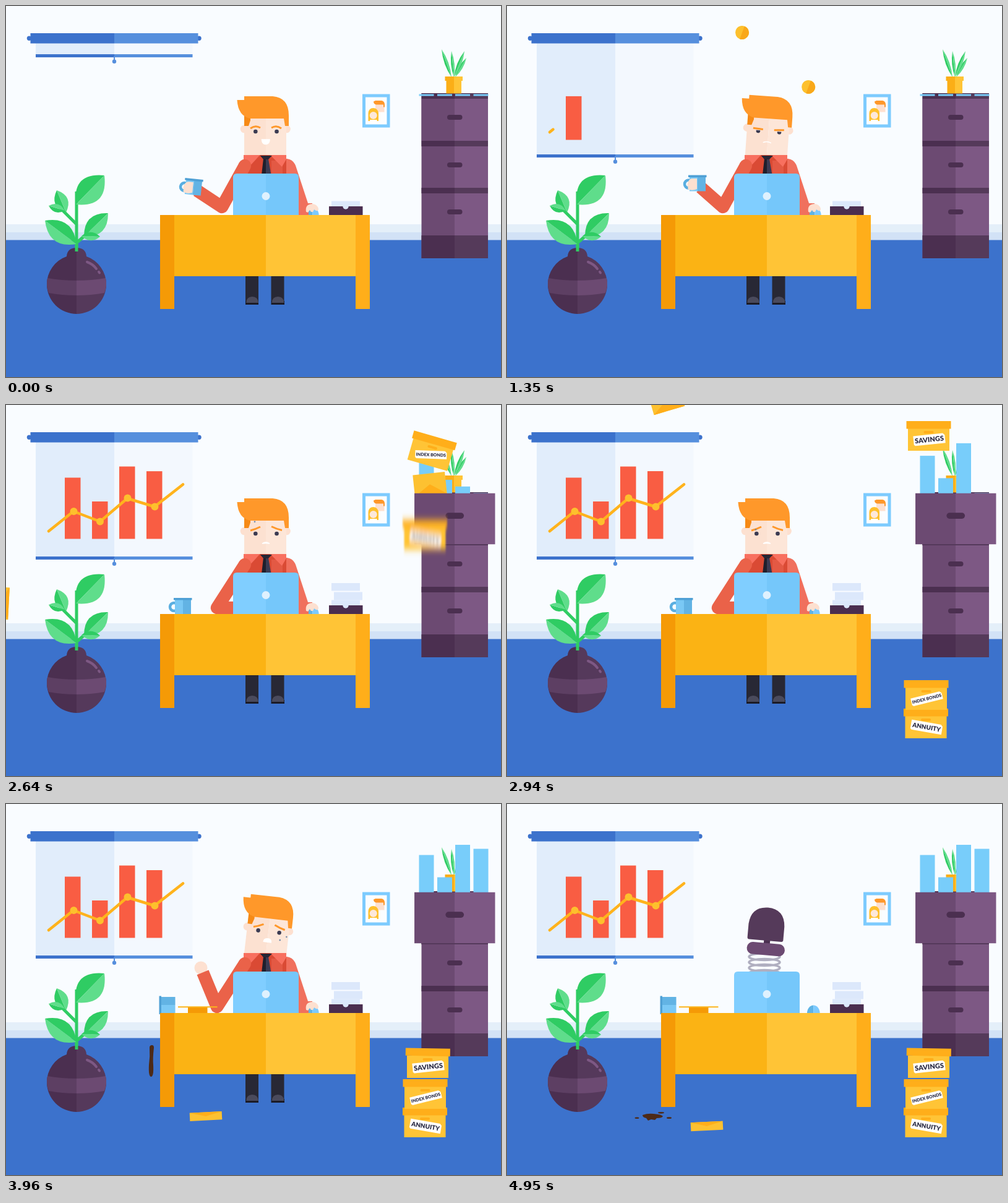
Recreate the animation shown at these times as an HTML page. Size 800 by 600 pixels, loop 5070 ms.

```html
<!DOCTYPE html>
<html lang="en">
<head>
<meta charset="utf-8">
<title>Busy office</title>
<style>
html, body { margin: 0; width: 100%; height: 100%; overflow: hidden; background: #f9fcff; }
svg { display: block; width: 100vw; height: 100vh; }
text { font-family: Lato, "Open Sans", sans-serif; font-weight: 900; text-anchor: middle; }
</style>
</head>
<body>
<svg viewBox="0 0 800 600">
  <defs>
    <filter id="blur" x="-20%" y="-40%" width="140%" height="180%"><feGaussianBlur stdDeviation="1 6"/></filter>
    <g id="envelope">
      <path fill="#fdc131" d="M-26-17.5h52v35h-52z"/>
      <path fill="#ffae1a" d="M-26-17.5h52L0 0z"/>
    </g>
    <g id="coinShape">
      <circle r="11" fill="#fdc02d"/>
      <path fill="#f9a81a" d="M0-11a11 11 0 0 1 0 22z"/>
    </g>
  </defs>

  <!-- room -->
  <path fill="#f9fcff" d="M0 0h800v353H0z"/>
  <path fill="#e4eff9" d="M0 353h800v14H0z"/>
  <path fill="#d2e2f6" d="M0 366h800v13H0z"/>
  <path fill="#3c72cc" d="M0 378.500h800V600H0z"/>

  <!-- projector screen -->
  <rect id="sheetL" x="48" y="58" width="127" fill="#e1edfb"/>
  <rect id="sheetR" x="175" y="58" width="126.500" fill="#f3f8fe"/>
  <g id="screenBar">
    <path fill="#3c72cc" d="M48 0h127v5H48z"/>
    <path fill="#568fdd" d="M175 0h126.500v5H175zM174 3h2v6h-2z"/>
    <circle cx="175" cy="11.700" r="3.200" fill="#568fdd"/>
  </g>
  <circle cx="37.500" cy="52.300" r="3.700" fill="#3c72cc"/>
  <circle cx="312" cy="52.300" r="3.700" fill="#3c72cc"/>
  <path fill="#3c72cc" d="M39.500 44H175v16.500H39.500z"/>
  <path fill="#568fdd" d="M175 44h135.500v16.500H175z"/>
  <g id="bars" fill="#f95d43"></g>
  <path id="trend" fill="none" stroke="#ffb31c" stroke-width="4.500" stroke-linecap="round" stroke-linejoin="round" d="M69 204L109 172L152 188.500L196 151L240 164.500L286 128.500"/>
  <g id="dots" fill="#fdc02d"></g>

  <!-- picture -->
  <path fill="#7dcbfe" d="M576 142.500h44.500v54H576z"/>
  <path fill="#fbfdff" d="M581 147.500h34.500v44H581z"/>
  <path fill="#fde0d0" d="M597 158h14.500v13.500H597z"/>
  <path fill="#ff982a" d="M594 154.500l3-1.500h10q5 1 5 6.500v4h-2v-4h-12q-4-1-4-5z"/>
  <path fill="#ffc02c" d="M585.500 186v-13q1-8 8-8t8.500 8v13z"/>
  <circle cx="593.700" cy="177" r="6" fill="#fde8da"/>
  <path fill="#fff" d="M588 184h11.500v7H588z"/>

  <!-- floor plant -->
  <g id="plant">
    <path fill="none" stroke="#2fcc63" stroke-width="5" d="M114 398V300M114 353L92 331M114 383L136 364"/>
  </g>
  <path fill="#4b2f50" d="M66 450a48 48 0 0 1 32-45q1-14 16-14v107a48 48 0 0 1-48-48z"/>
  <path fill="#55395b" d="M162 450a48 48 0 0 0-32-45q-1-14-16-14v107a48 48 0 0 0 48-48z"/>
  <path fill="#5d3f63" d="M67 440q22 4 47 4v24q-24 0-45-4q-5-12-2-24z"/>
  <path fill="#6c4a72" d="M161 440q-22 4-47 4v24q24 0 45-4q5-12 2-24z"/>
  <path fill="none" stroke="#7d5884" stroke-width="4" stroke-linecap="round" d="M131 414q9 3 15 11M150 430l1 1.500"/>
  <path fill="#2fcc63" d="M111.500 385h5v12h-5z"/>

  <!-- cabinet -->
  <path fill="#6c4a72" d="M671.500 141H725v267h-53.500z"/>
  <path fill="#7d5884" d="M725 141h54v267h-54z"/>
  <path fill="#4b2f50" d="M671.500 141H725v9h-53.500zM671.500 218H725v9h-53.500zM671.500 294H725v9h-53.500zM671.500 371H725v37h-53.500z"/>
  <path fill="#553a5a" d="M725 141h54v9h-54zM725 218h54v9h-54zM725 294h54v9h-54zM725 371h54v37h-54z"/>
  <g fill="#4b2f50">
    <rect x="713" y="253" width="24.500" height="8" rx="4"/>
    <rect x="713" y="329" width="24.500" height="8" rx="4"/>
  </g>
  <g id="potPlant"></g>
  <path fill="#fbae17" d="M711.500 121H724v20.500h-12.500zM709.500 114H724v7h-14.500z"/>
  <path fill="#ffc436" d="M724 121h12v20.500h-12zM724 114h14v7h-14z"/>
  <g id="books" fill="#78cdfa"></g>
  <use id="envC" href="#envelope"/>
  <g id="drawer">
    <path fill="#6c4a72" d="M671.500 150H725v68h-53.500z"/>
    <path fill="#7d5884" d="M725 150h54v68h-54z"/>
    <rect x="713" y="176" width="24.500" height="8" rx="4" fill="#4b2f50"/>
  </g>
  <path id="drawerEdge" fill="#55395b" d="M671.500 225h107.500v2H671.500z"/>

  <!-- storage boxes -->
  <g id="boxes"></g>

  <!-- chair -->
  <g id="chair">
    <g fill="none" stroke="#b0afc0" stroke-width="3.500">
      <ellipse cx="416" cy="247" rx="25" ry="5.500"/>
      <ellipse cx="416" cy="256" rx="25" ry="5.500"/>
      <ellipse cx="416" cy="265" rx="25" ry="5.500"/>
      <ellipse cx="416" cy="274" rx="25" ry="5.500"/>
    </g>
    <g transform="rotate(5 419 235)">
      <path fill="#4b2f50" d="M414 215h10v14h-10z"/>
      <rect x="387.500" y="225" width="61.500" height="19.500" rx="9.500" fill="#6c4a72"/>
      <path fill="#553a5a" d="M387 218v-22q2-28 29-28.500q27 .5 29 28.500v22q0 3-3 3h-52q-3 0-3-3z"/>
    </g>
  </g>

  <!-- mouse -->
  <g id="mouse">
    <path fill="#5fb4e6" d="M485 338a10.300 12.500 0 0 1 10.300-12.500V338z"/>
    <path fill="#7ccaff" d="M495.300 325.500a10.300 12.500 0 0 1 10.300 12.500h-10.300z"/>
  </g>

  <!-- man -->
  <g id="man">
    <path fill="#282835" d="M387 325h21v152h-21zM428.500 325h21v152h-21z"/>
    <path fill="#1b1b26" d="M387 477h21v6h-21zM428.500 477h21.500v6h-21.500z"/>
    <path fill="#4a4a5c" d="M388 480q1-10 10-10t10 10zM429.500 480q1-10 10-10t10 10z"/>
    <g id="head">
      <circle cx="385" cy="199" r="6.300" fill="#fde0d0"/>
      <circle cx="453.500" cy="199" r="6.300" fill="#fde0d0"/>
      <path fill="#fce1d1" d="M385 176h35v70h-35z"/>
      <path fill="#fde6d8" d="M420 176h33v70h-33z"/>
      <path fill="#f68a16" d="M385 174h10v11l-3 9h-7z"/>
      <path fill="#ff982a" d="M373.500 152H385v-6h46q26 2 26 31v17h-6l-2-12h-54q-20-4-21.500-30z"/>
      <g fill="#3b3b52"><circle cx="403.300" cy="203" r="3.300"/><circle cx="437.500" cy="203" r="3.300"/></g>
      <path id="lids" fill="#fde3d4" d="M398 198h10v4h-10zM432 198h10v4h-10z"/>
      <path id="brows" fill="none" stroke="#ff982a" stroke-width="3"/>
      <path id="mouth" stroke="#fff" stroke-width="1.500" stroke-linecap="round"/>
      <g id="sweat" fill="#6d87a8"></g>
    </g>
    <path fill="#f0705d" d="M445 247h9q10 1 14 11l21 64v16h-17l-20-60z"/>
    <path fill="#da4a34" d="M384 241h69v99h-69z"/>
    <path fill="#e35944" d="M429 250h18v30h-18z"/>
    <path fill="#f8705f" d="M384 241h26.500L393 260l-9-12zM453 241h-26l19 19l7-12z"/>
    <path fill="#1f1f2c" d="M411 242h9v31h-7l3-26z"/>
    <path fill="#3a3a52" d="M420 247l4 0 4.500 26H420z"/>
    <path fill="#262635" d="M411 242h19l-6 6h-8z"/>
    <g id="leftArm">
      <circle id="hand" r="10.500" fill="#fde0d0"/>
      <path id="sleeve" fill="none" stroke="#ea6249" stroke-width="20.500" stroke-linejoin="round"/>
      <circle cx="386" cy="258" r="10.200" fill="#ea6249"/>
    </g>
    <g id="mouseHand" fill="#fde0d0">
      <path fill="#f0705d" d="M482 319h13v4h-13z"/>
      <path d="M485 333q-2-12 9-13q9 0 11 8q0 4-4 3l-3-2l-2 4h-3l-2-3l-3 4z"/>
    </g>
  </g>

  <!-- mug -->
  <g id="mug">
    <circle cx="-14.500" cy="1" r="6.500" fill="none" stroke="#5aaee0" stroke-width="4.500"/>
    <path fill="#7ac8f5" d="M-13-12H0v24.500h-13z"/>
    <path fill="#62b3e4" d="M0-12h13v24.500H0z"/>
    <path fill="#4fa0d5" d="M-15-13.500h29.500v3.500H-15z"/>
    <path id="fingers" fill="#fde0d0" d="M-15-3q2-5 7-5h7v17q-6 3-13 1q-3-2-1-5q-3-2-1-4q-1-2 1-4z"/>
  </g>
  <g id="deskNote">
    <path fill="#f59a06" d="M294 329h31.500v9H294z"/>
    <path fill="#fdb51c" d="M278 327.300h63.500v2H278z"/>
  </g>

  <!-- desk and laptop -->
  <g id="papers" fill="#dce8fb">
    <path d="M526 315.500h46V326h-46z"/>
    <path id="paper1" d="M530 302.500h46v13h-46z"/>
    <path id="paper2" d="M526 289h46v12.500h-46z"/>
  </g>
  <path fill="#4a2e4f" d="M522 324h54.500v14H522z"/>
  <circle cx="549" cy="324" r="4.700" fill="#dce8fb"/>
  <path fill="#80ceff" d="M420 271v67h-53v-61q0-6 6-6z"/>
  <path fill="#75c7fa" d="M420 271v67h53v-61q0-6-6-6z"/>
  <circle cx="420" cy="307.500" r="6.500" fill="#dff1fe"/>
  <path fill="#fbb314" d="M271 338h149v99H271z"/>
  <path fill="#ffc436" d="M420 338h146v99H420z"/>
  <path fill="#f59a06" d="M249 338h23v152h-23z"/>
  <path fill="#ffae1a" d="M565 338h23v152h-23z"/>

  <!-- flying things -->
  <path id="drop" fill="#4d2a17" d="M232 394q0-4 4-4q3 0 3 4q-2 18-1 28q1 19-3.500 19q-4.500 0-3.500-19q2-14 1-28z"/>
  <g id="splat" fill="#4d2a17">
    <path d="M219 503q8-3 18-2q13 1 15 4q-1 3-10 3l-3 3l-6-1l-5 2l-3-4q-6-1-6-5z"/>
    <ellipse cx="249" cy="499.300" rx="5" ry="1.400"/>
    <ellipse cx="262" cy="507.700" rx="4" ry="1.400"/>
    <ellipse cx="210" cy="507.700" rx="3.500" ry="1.200"/>
  </g>
  <use id="envL" href="#envelope"/>
  <use id="envA" href="#envelope"/>
  <use id="envB" href="#envelope"/>
  <use id="coin0" href="#coinShape"/>
  <use id="coin1" href="#coinShape"/>
  <text id="dollar" font-size="35" y="12" fill="#3fd57a">$</text>
</svg>

<script>
const LOOP = 5070, STEP = 30;
const $ = id => document.getElementById(id);

function add(parent, tag, attrs) {
  const el = document.createElementNS('http://www.w3.org/2000/svg', tag);
  for (const name in attrs) el.setAttribute(name, attrs[name]);
  parent.appendChild(el);
  return el;
}
const set = (el, name, value) => el.setAttribute(name, value);
const place = (el, x, y, r = 0, sx = 1, sy = sx) =>
  set(el, 'transform', `translate(${x} ${y}) rotate(${r}) scale(${sx} ${sy})`);
const turn = (el, dx, dy, r, cx, cy) =>
  set(el, 'transform', `translate(${dx} ${dy}) rotate(${r} ${cx} ${cy})`);
const show = (el, on) => { el.style.display = on ? '' : 'none'; };

// Eased value from pairs: time, value, time, value ...
function key(t, ...k) {
  if (t <= k[0]) return k[1];
  for (let i = 2; i < k.length; i += 2) {
    if (t < k[i]) {
      const u = (t - k[i - 2]) / (k[i] - k[i - 2]);
      return k[i - 1] + (k[i + 1] - k[i - 1]) * u * u * (3 - 2 * u);
    }
  }
  return k[k.length - 1];
}
const line = (t, t0, a, t1, b) => a + (b - a) * Math.min(1, Math.max(0, (t - t0) / (t1 - t0)));
const fall = (t, t0, a, t1, b) => a + (b - a) * line(t, t0, 0, t1, 1) ** 2;
const spring = s => s <= 0 ? 0 : 1 - Math.exp(-0.0092 * s) * Math.cos(0.0105 * s);

// Two-tone leaf from base to tip
function leaf(parent, x1, y1, x2, y2, fat, c1 = '#2fcc63', c2 = '#5fdd8b') {
  [[1, c1], [-1, c2]].forEach(([side, fill]) => {
    const cx = (x1 + x2) / 2 + (y2 - y1) * fat * side;
    const cy = (y1 + y2) / 2 - (x2 - x1) * fat * side;
    add(parent, 'path', { fill, d: `M${x1} ${y1}Q${cx} ${cy} ${x2} ${y2}z` });
  });
}
leaf($('plant'), 113, 321, 159, 274, 0.62);
leaf($('plant'), 97, 334, 82, 298, 0.55);
leaf($('plant'), 95, 331, 69, 323, 0.5);
leaf($('plant'), 114, 385, 63, 347, 0.52, '#5fdd8b', '#2fcc63');
leaf($('plant'), 126, 373, 165, 335, 0.52);
leaf($('plant'), 122, 372, 152, 373, 0.45);
leaf($('potPlant'), 720, 115, 704, 70, 0.13);
leaf($('potPlant'), 724, 115, 720, 73, 0.13);
leaf($('potPlant'), 726, 115, 744, 84, 0.16);
leaf($('potPlant'), 724, 115, 741, 73, 0.14);

const bars = [[95, 99], [139, 60.5], [183, 117], [227, 109.5]].map(([x, h]) =>
  ({ h, el: add($('bars'), 'rect', { x, width: 25.5 }) }));
const dots = [[109.5, 172, 51], [152, 188.5, 97], [196.5, 150.500, 155], [240.5, 164.5, 201]].map(([cx, cy, at]) =>
  ({ at, el: add($('dots'), 'circle', { cx, cy }) }));
const books = [[667.5, 60, 2520], [697, 24, 2520], [726, 76.5, 2625], [755.5, 70, 3180]].map(([x, h, start]) =>
  ({ h, start, el: add($('books'), 'rect', { x, width: 24 }) }));
const drops = [[402, 2600], [392, 3020], [440, 3190], [450, 3340]].map(([cx, start]) =>
  ({ start, el: add($('sweat'), 'circle', { cx, r: 1.3 }) }));

// Box drawn around its own centre
function makeBox(label, size, tilt, lh) {
  const g = add($('boxes'), 'g', {});
  add(g, 'path', { fill: '#ffc436', d: 'M-33.500-12h67v36h-67z' });
  add(g, 'rect', { x: -8, y: -8, width: 16, height: 4, rx: 2, fill: '#ffae1a' });
  const tag = add(g, 'g', { transform: `translate(1 6) rotate(${tilt})` });
  add(tag, 'path', { fill: '#fff', d: `M-25.500 ${-lh / 2}h48l3 3v${lh - 3}h-49l-2-2z` });
  add(tag, 'text', { 'font-size': size, y: size * 0.36, fill: '#2d2d44' }).textContent = label;
  const lid = add(g, 'path', { fill: '#ffae1a', d: 'M-36-24h72v12.500h-72z' });
  return { g, lid };
}
const annuity = makeBox('ANNUITY', 10, 10, 16);
const bonds = makeBox('INDEX BONDS', 7, -14, 13);
const savings = makeBox('SAVINGS', 11, -6, 16);

const trendLength = $('trend').getTotalLength();

// Drops in, hits the head, then flies off under gravity
function coin(el, t, hit, x, y, vx, up) {
  const s = t - hit, g = 0.0009;
  show(el, s > -230 && s < 1000);
  if (s < 0) return place(el, x, fall(t, hit - 230, -14, hit, y), 20);
  const land = (up + Math.sqrt(up * up + 4 * g * (456 - y))) / (2 * g);
  const b = s - land;
  const cy = b < 0 ? y - up * s + g * s * s : 456 - 0.25 * b + g * b * b;
  place(el, x + vx * s, cy, 20 + vx * (s - 115) * 0.5);
}

function drawScreen(t) {
  const y = key(t, 640, 78, 1180, 251, 1350, 240, 1500, 245);
  set($('sheetL'), 'height', y - 57);
  set($('sheetR'), 'height', y - 57);
  place($('screenBar'), 0, y);
  bars.forEach(({ h, el }, i) => {
    const now = h * spring(t - 1265 - 230 * i);
    set(el, 'y', 216.5 - now);
    set(el, 'height', now);
  });
  const drawn = line(t, 1317, 0, 2522, trendLength);
  show($('trend'), drawn > 0);
  set($('trend'), 'stroke-dasharray', `${drawn} 999`);
  dots.forEach(({ at, el }) => set(el, 'r', line(drawn, at - 10, 0, at + 12, 6)));
}

function drawCabinet(t) {
  const open = spring(t - 1945);
  const sx = 1 + 0.213 * open, sy = 1 + 0.213 * open;
  set($('drawer'), 'transform', `translate(725.300 184.400) scale(${sx} ${sy}) translate(-725.300 -184.400)`);
  show($('drawerEdge'), open > 0.5);
  books.forEach(({ h, start, el }) => {
    const now = h * spring(t - start);
    set(el, 'y', 142.5 - now);
    set(el, 'height', now + 3);
  });
  place($('envC'), 685, fall(t, 2480, -40, 2700, 188 + 90), 174);
  show($('envC'), t > 2480 && t < 2670);

  place(annuity.g, 677, fall(t, 2480, -50, 2716, 515));
  set(annuity.g, 'filter', t > 2560 && t < 2716 ? 'url(#blur)' : 'none');
  place(bonds.g, 677.5 + key(t, 2640, 10, 2786, 0), fall(t, 2500, -50, 2786, 469), key(t, 2640, 16, 2786, 0));
  place(savings.g, 681.5, fall(t, 2820, -50, 3080, 419));
  place(savings.lid, 0, key(t, 3080, 0, 3150, -12, 3270, -3, 3400, 0),
    key(t, 3080, 0, 3150, -8, 3270, -3, 3400, 1));
}

const FACES = {
  happy: ['M395 198q8-6 16-1M429 197q8-5 16 1', 'M413.500 216h12.500q0 7-6 7.500t-6.500-7.500z'],
  angry: ['M395 199l16 1M429 200l16-1', 'M413 221q6-3 12 0'],
  sad: ['M395 198q8-2 16-6M429 191.500q8 4 17 6', 'M414 219q6-4 12 0q-6-1-12 0z'],
  gasp: ['M395 198q8-2 16-6M429 191.500q8 4 17 6', 'M414 220q0-5 6-5.500t6 5.500z']
};

function drawMan(t) {
  const crouch = key(t, 4540, 0, 4690, 14);
  const lift = t > 4690 ? 14 - 520 * ((t - 4690) / 250) ** 2 : crouch;
  place($('man'), 0, lift);
  show($('man'), t < 4940);

  const idle = t < 1080 ? Math.sin(t / 540 * Math.PI) : 0;
  const tilt = key(t, 1220, 0, 1350, 4, 1440, 2, 1530, -4, 1700, 0, 3720, 0, 3960, 6.5, 4400, 0);
  turn($('head'), 0, key(t, 1640, 0, 2040, 4, 2640, 5, 3720, 5, 3960, 3) - 2 * Math.abs(idle), tilt - idle, 420, 240);

  const mood = t < 1230 ? 'happy' : t < 1680 ? 'angry' : t < 3100 ? 'sad' : 'gasp';
  set($('brows'), 'd', FACES[mood][0]);
  set($('mouth'), 'd', FACES[mood][1]);
  set($('mouth'), 'fill', mood === 'angry' ? 'none' : '#fff');
  show($('lids'), mood === 'angry');
  drops.forEach(({ start, el }) => {
    show(el, t > start && t < start + 800);
    set(el, 'cy', line(t, start, 182, start + 800, 216));
  });

  // Left arm and mug
  const mx = key(t, 540, 303, 1350, 308, 1650, 308, 1900, 286) - 4 * idle;
  const my = key(t, 540, 293, 1350, 287, 1650, 287, 1900, 325.5) - 3 * Math.abs(idle);
  const mr = key(t, 540, 6, 1350, 0);
  const held = t < 1950;
  const hx = held ? mx - 1 : key(t, 2100, 286, 2400, 380, 3690, 380, 3810, 288, 3960, 315, 4360, 315, 4560, 380);
  const hy = held ? my + line(t, 1700, 1, 1900, 2.5) : key(t, 2000, 328, 3780, 328, 3960, 265, 4360, 265, 4560, 328);
  const ex = key(t, 1650, 349, 1900, 352, 2100, 352, 2400, 341);
  const ey = key(t, 1650, 325, 1900, 328);
  const reach = Math.hypot(hx - ex, hy - ey) || 1;
  const cut = Math.max(0, reach - 8) / reach;
  set($('hand'), 'cx', hx);
  set($('hand'), 'cy', hy);
  set($('sleeve'), 'd', `M386 258L${ex} ${ey}L${ex + (hx - ex) * cut} ${ey + (hy - ey) * cut}`);

  const tip = key(t, 3790, 0, 3900, 1);
  place($('mug'), mx - 25 * tip, my - 0.5 * tip, mr - 90 * tip);
  show($('fingers'), t < 1880);

  const slide = key(t, 540, 0, 1350, 2, 2040, 4, 2500, 0);
  place($('mouse'), slide, 0);
  place($('mouseHand'), slide, 0);

  show($('chair'), t > 4700);
  turn($('chair'), 0, key(t, 4700, 110, 4830, -14, 4900, 6, 4950, 0), key(t, 4780, -4, 4870, 3, 4950, 0), 416, 275);
}

function drawFlying(t) {
  coin($('coin0'), t, 1235, 440, 135, 0.41, 0.138);
  coin($('coin1'), t, 1440, 380, 140, -0.55, 0.298);

  place($('dollar'), key(t, 1700, 375, 2040, 344, 2300, 352), line(t, 1700, 265, 2340, 48), -8);
  set($('dollar'), 'opacity', Math.min(line(t, 1700, 0, 1800, 1), line(t, 1880, 1, 2240, 0)));

  place($('paper1'), 0, fall(t, 1440, -330, 1700, 0));
  turn($('paper2'), 0, fall(t, 1780, -310, 2040, -1), key(t, 1900, -14, 2040, -4, 2130, 0), 549, 296);

  place($('envL'), key(t, 1800, -40, 2040, 21, 2250, -40, 2500, -40, 2640, -13, 2720, -40),
    line(t, 1650, 89, 2720, 339), key(t, 1800, 0, 2040, 35, 2640, 93), key(t, 2040, 0.75, 2500, 1));
  show($('envL'), t < 2730);

  const ay = t < 3270 ? line(t, 2900, -40, 3270, 256) : key(t, 3270, 256, 3510, 328);
  place($('envA'), key(t, 2900, 255, 3270, 333.5, 3510, 310), ay,
    key(t, 2900, -200, 3270, -90.5, 3510, 0), 1, key(t, 3360, 1, 3510, 0.05));
  show($('envA'), t > 2890 && t < 3510);
  show($('deskNote'), t >= 3510);

  place($('envB'), key(t, 3420, -40, 3930, 323), key(t, 3420, 430, 3720, 540, 3960, 505, 4260, 521),
    key(t, 3420, -150, 3930, -3), 1, key(t, 3420, 1, 3930, 0.38, 4260, 0.4));

  show($('drop'), t > 3870 && t < 4050);
  place($('drop'), 0, line(t, 3870, -72, 4050, 72));
  const spread = key(t, 4020, 0, 4400, 1);
  place($('splat'), 235 * (1 - spread), 506 * (1 - spread), 0, spread);
}

const start = performance.now();
function frame() {
  const now = Math.max(0, performance.now() - start) % LOOP;
  const t = Math.min(4950, Math.floor(now / STEP) * STEP);
  drawScreen(t);
  drawCabinet(t);
  drawMan(t);
  drawFlying(t);
  requestAnimationFrame(frame);
}
frame();
</script>
</body>
</html>
```
